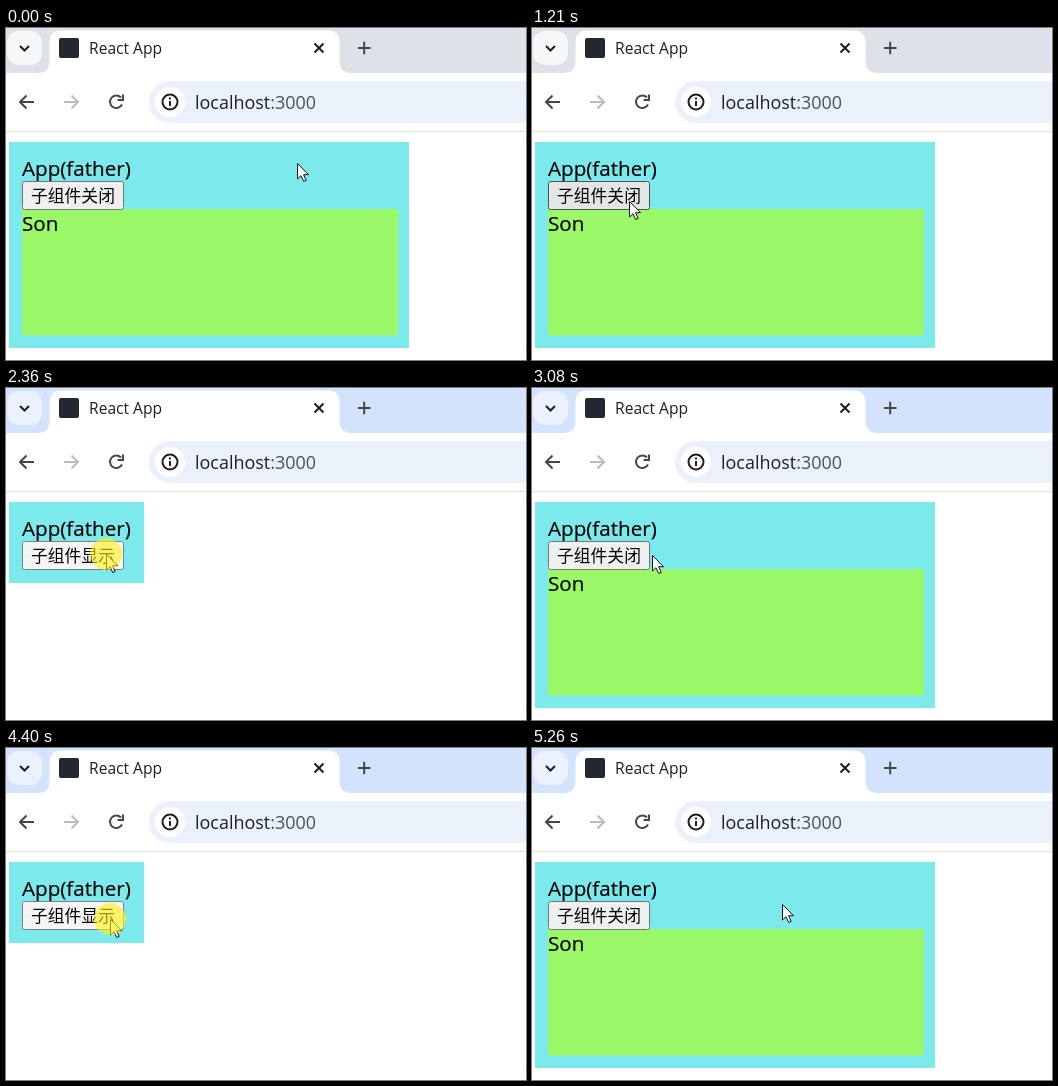
An HTML page for the animation above (5320 ms loop, 520 by 332 pixels).

```html
<!DOCTYPE html>
<html lang="en">
<head>
<meta charset="utf-8">
<title>Toggle child component</title>
<style>
  html, body { margin: 0; width: 100%; height: 100%; overflow: hidden; background: #fff; }
  svg { display: block; }
  text { font-family: "Open Sans", "Noto Sans", sans-serif; }
  .page { font-size: 20.6px; stroke: #000; stroke-width: .2; }
  #label { font: 16.8px "Noto Sans CJK SC", "Noto Sans CJK", sans-serif; }
  .icon { fill: none; stroke: #474747; stroke-width: 2; }
  .dark { stroke: #1f1f1f; }
  .faint { stroke: #bdbcb4; }
</style>
</head>
<body>
<svg width="520" height="332" viewBox="0 0 520 332">
  <!-- tab strip -->
  <rect id="strip" width="520" height="45"/>
  <rect id="search" x="1" y="3" width="35" height="34" rx="12"/>
  <path class="icon dark" d="M14 18l4.500 4.500L23 18"/>
  <path fill="#fff" d="M31.500 45q12 0 12-12V14.500q0-12 12-12h266q12 0 12 12V33q0 12 12 12Z"/>
  <rect x="53" y="10" width="20" height="20" rx="2" fill="#23272f"/>
  <text x="83" y="26" font-size="15.6" fill="#1f1f1f">React App</text>
  <path class="icon dark" d="M308.500 15.500l9 9m0-9l-9 9"/>
  <path class="icon" d="M352 20h12.500M358.200 13.800v12.500"/>

  <!-- toolbar -->
  <path id="arrow" class="icon" d="M28 74H14.500M20.500 67.500L14 74l6.500 6.500"/>
  <path class="icon faint" d="M58 74h13.500M65.500 67.500L72 74l-6.500 6.500"/>
  <path class="icon" d="M116 76.500A6.300 6.300 0 1 1 115 69.500M117 66.500v5.500h-5.500"/>
  <rect x="143" y="53" width="420" height="42" rx="21" fill="#ebf1fa"/>
  <circle cx="164" cy="74" r="15" fill="#fff"/>
  <circle class="icon dark" cx="164" cy="74" r="7.500"/>
  <path class="icon dark" d="M164 73v5M164 69.500v2"/>
  <text x="189" y="80.500" font-size="17.950" fill="#1f1f1f">localhost<tspan fill="#4c5156">:3000</tspan></text>
  <path stroke="#dfe1e5" d="M0 103.500h520"/>

  <!-- page -->
  <rect id="father" x="3" y="114" fill="#7ceaed"/>
  <text class="page" x="16" y="148">App(father)</text>
  <g id="son">
    <rect x="16" y="181" width="376" height="126.500" fill="#9bf869"/>
    <text class="page" x="16" y="203">Son</text>
  </g>
  <rect id="button" x="16.500" y="153.500" width="101" height="28" rx="2"/>
  <text id="label" x="25" y="174"></text>

  <g id="pointer">
    <path fill="#fff" stroke="#111" stroke-linejoin="round"
      d="M.5 .5V16L4 12.700L6.700 18.500L9.200 17.400L6.600 11.700H11.500Z"/>
    <circle id="glow" r="16" fill="#fff014" opacity=".6"/>
  </g>
</svg>
<script>
const LOOP = 5320, STEP = 70;
const HOME = [291, 135];
const CLICKS = [1430, 2360, 3390, 4400];
// Each trip eases to a point and swings sideways on the way.
const TRIPS = [
  { start: 70, end: 550, to: [103, 66], swing: [-9, 13] },
  { start: 620, end: 1210, to: [97, 173], swing: [-22, 15] },
  { start: 1860, end: 2290, to: [100, 166], swing: [27, 6] },
  { start: 2660, end: 3240, to: [112, 167], swing: [45, 0] },
  { start: 3610, end: 4120, to: [104, 171], swing: [18, 4] },
  { start: 4540, end: 4960, to: [261, 150], swing: [0, 24] },
  { start: 5180, end: 5260, to: [250, 156], swing: [0, 0] }
];

const $ = id => document.getElementById(id);
const set = (id, attrs) => {
  for (const key in attrs) $(id).setAttribute(key, attrs[key]);
};
const show = (id, on) => set(id, { visibility: on ? "visible" : "hidden" });

// The pointer is sampled every STEP, so it holds still in between.
function pointerAt(t) {
  let at = HOME;
  for (const { start, end, to, swing } of TRIPS) {
    if (t < start) break;
    const steps = Math.floor((t - start) / STEP + 1e-6) + 1;
    const u = t >= end ? 1 : Math.min(1, steps * STEP / (end - start + STEP));
    const ease = 1 - (1 - u) ** 2;
    at = at.map((a, i) =>
      Math.round(a + (to[i] - a) * ease + swing[i] * Math.sin(Math.PI * ease)));
  }
  return at;
}

function draw(now) {
  const t = now % LOOP;
  const [x, y] = pointerAt(t);
  // Closing clicks are held longer than opening ones.
  const release = (down, i) => down + (i % 2 ? 70 : 130);
  const pressed = CLICKS.some((down, i) => t >= down && t < release(down, i));
  const open = CLICKS.filter((down, i) => t >= release(down, i)).length % 2 === 0;
  const hover = x >= 16 && x < 118 && y >= 153 && y < 182;
  const focused = t >= CLICKS[0];

  set("strip", { fill: focused ? "#d3e3fd" : "#dde1e8" });
  set("search", { fill: focused ? "#ebf2fe" : "#f6f7f9" });
  set("father", { width: open ? 400 : 135, height: open ? 206 : 81 });
  show("son", open);
  const [fill, stroke] = pressed ? ["#f5f5f5", "#808080"]
    : hover ? ["#e5e5e5", "#4f4f4f"] : ["#efefef", "#767676"];
  set("button", { fill, stroke });
  $("label").textContent = open ? "子组件关闭" : "子组件显示";
  show("glow", pressed);
  set("pointer", { transform: `translate(${x} ${y})` });
  requestAnimationFrame(draw);
}
draw(0);
</script>
</body>
</html>
```
